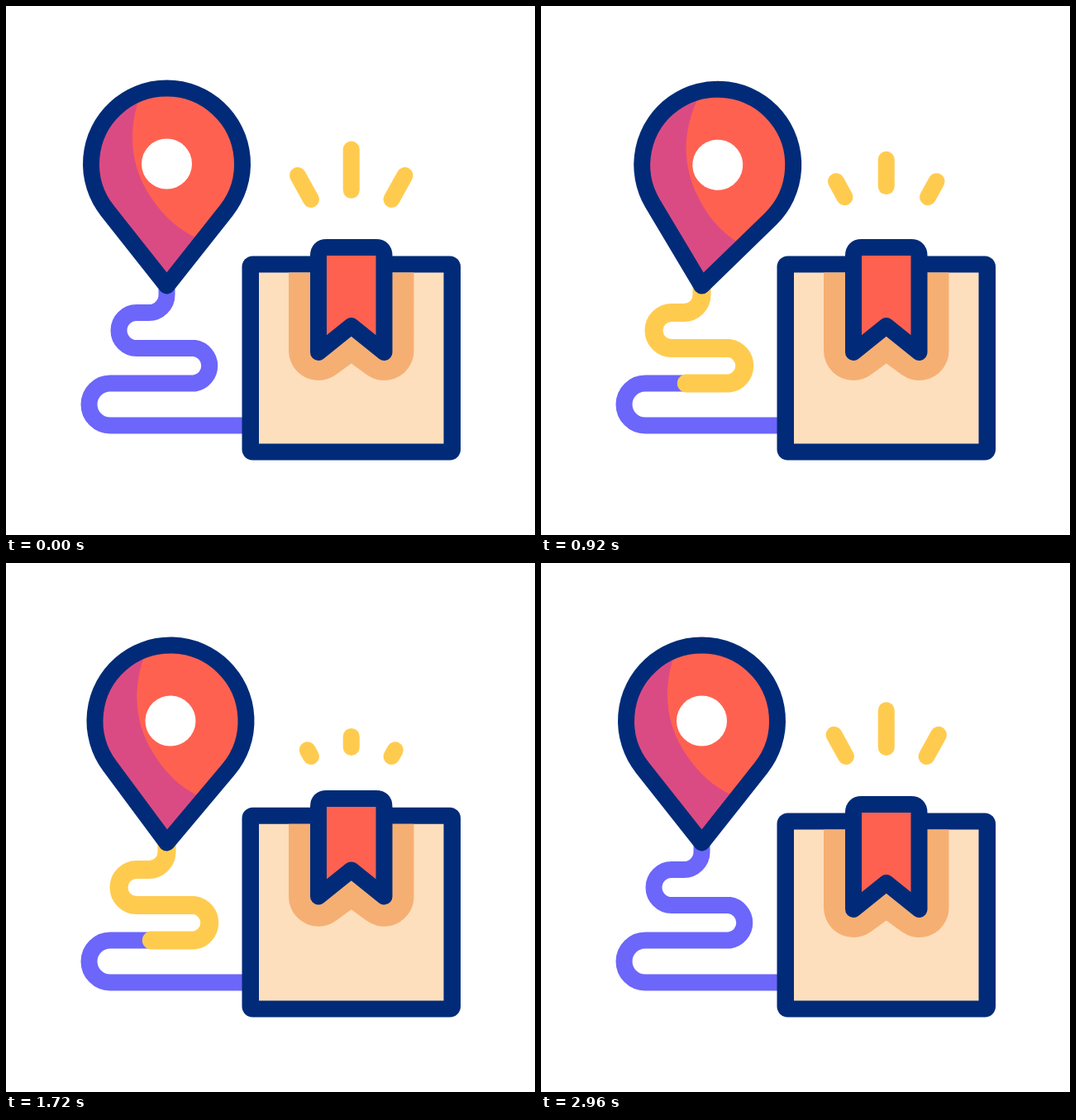
Write an HTML page with a canvas that moves like this. It is 640 by 640 pixels and loops after 3000 ms.

```html
<!DOCTYPE html>
<html lang="en">
<head>
<meta charset="utf-8">
<title>Parcel tracking</title>
<style>
html, body { margin: 0; width: 100%; height: 100%; overflow: hidden; background: #fff; }
canvas { display: block; width: 640px; height: 640px; }
</style>
</head>
<body>
<canvas id="stage" width="640" height="640"></canvas>
<script>
const ctx = document.getElementById('stage').getContext('2d');
const NAVY = '#012b78', RED = '#ff6150', PINK = '#db4b83', PURPLE = '#6c66fa',
      YELLOW = '#ffcb4f', PEACH = '#fddfbd', ORANGE = '#f6af73';
const LOOP = 3000;

const route = new Path2D('M194.5 338V349.5A21.5 21.5 0 0 1 173 371H158A21.5 21.5 0 0 0 158 414' +
  'H228A21.5 21.5 0 0 1 228 456.5H126A25.5 25.5 0 0 0 126 507.5H296');
const ROUTE_LENGTH = 617;

// The pin is drawn around its tip, so it can swing from there.
const pin = new Path2D('M0 0L-71.8 -90.8A91.5 91.5 0 1 1 71.8 -90.8Z');
const pinShade = new Path2D('M-33 -228C-48 -184 -43 -142 -19 -107C-4 -84 14 -68 38 -57L0 0L-130 -60V-228Z');

const rays = [[369, 234, 353, 205], [417.75, 223, 417.75, 173.5], [466.5, 234, 482.5, 205]];
// Per burst: outer end moves from, to; inner end moves from, to.
const bursts = [[-400, 0, 0, 360], [620, 1020, 885, 1250], [1615, 2015, 1880, 2245], [2600, 3000, 3000, 3360]];
const waves = [720, 1520];
const swing = [[200, 0], [600, -5.5], [1030, 9.8], [1430, -11.8], [1840, 5], [2200, -6.3], [2520, 0]];

const ramp = (t, a, b) => Math.min(1, Math.max(0, (t - a) / (b - a)));
const smooth = u => (1 - Math.cos(Math.PI * u)) / 2;
const mix = (a, b, u) => a + (b - a) * u;

function ease(keys, t) {
  let value = keys[0][1];
  for (let i = 1; i < keys.length; i++) {
    const [t0, v0] = keys[i - 1], [t1, v1] = keys[i];
    value += (v1 - v0) * smooth(ramp(t, t0, t1));
  }
  return value;
}

function stroke(path, color, width) {
  ctx.strokeStyle = color;
  ctx.lineWidth = width;
  ctx.stroke(path);
}

function fill(path, color) {
  ctx.fillStyle = color;
  ctx.fill(path);
}

function drawRoute(t) {
  stroke(route, PURPLE, 20);
  for (const start of waves) {
    const head = ramp(t, start, start + 400), tail = ramp(t, start + 400, start + 820);
    if (head <= 0 || tail >= 1) continue;
    ctx.setLineDash([(head - tail) * ROUTE_LENGTH, 9999]);
    ctx.lineDashOffset = -tail * ROUTE_LENGTH;
    stroke(route, YELLOW, 22);
    ctx.setLineDash([]);
  }
}

function drawPin(t) {
  const lift = 26 * Math.max(0, 1 - ((t - 400) / 180) ** 2);
  ctx.save();
  ctx.translate(194.5, 338.5 - lift);
  ctx.rotate(ease(swing, t) * Math.PI / 180);
  fill(pin, RED);
  ctx.save();
  ctx.clip(pin);
  fill(pinShade, PINK);
  ctx.restore();
  stroke(pin, NAVY, 20);
  const hole = new Path2D();
  hole.arc(0, -147.5, 30.5, 0, 7);
  fill(hole, '#fff');
  ctx.restore();
}

function drawRays(t) {
  for (const [a, b, c, d] of bursts) {
    const head = ramp(t, a, b), tail = ramp(t, c, d);
    if (head <= 0 || tail >= 1) continue;
    for (const [x0, y0, x1, y1] of rays) {
      const line = new Path2D();
      line.moveTo(mix(x0, x1, tail), mix(y0, y1, tail));
      line.lineTo(mix(x0, x1, head), mix(y0, y1, head));
      stroke(line, YELLOW, 20);
    }
  }
}

function drawBox(t) {
  const rise = smooth(ramp(t, 1520, 1920)) - smooth(ramp(t, 2480, 2880));
  const top = 302.5 - 13.5 * rise;

  const outer = new Path2D();
  outer.roundRect(285.5, top, 264.5, 549.5 - top, 13);
  fill(outer, NAVY);
  const inner = new Path2D();
  inner.rect(306, top + 20, 223.5, 509.5 - top);
  fill(inner, PEACH);

  ctx.save();
  ctx.clip(inner);
  const low = 417 - 26.5 * rise;
  const shade = new Path2D(`M378 250V${low}L417.75 ${low - 29}L457.5 ${low}V250Z`);
  fill(shade, ORANGE);
  stroke(shade, ORANGE, 72);
  ctx.restore();

  const y = 292 - 14 * rise, end = 419 - 31 * rise;
  const ribbon = new Path2D(`M378 ${y + 10}V${end}L417.75 ${end - 32}L457.5 ${end}V${y + 10}` +
    `Q457.5 ${y} 447.5 ${y}H388Q378 ${y} 378 ${y + 10}Z`);
  fill(ribbon, RED);
  stroke(ribbon, NAVY, 20);
}

function draw(now) {
  const t = now % LOOP;
  ctx.fillStyle = '#fff';
  ctx.fillRect(0, 0, 640, 640);
  ctx.lineCap = ctx.lineJoin = 'round';
  drawRoute(t);
  drawPin(t);
  drawRays(t);
  drawBox(t);
}

const begin = performance.now();
function tick() {
  draw(performance.now() - begin);
  requestAnimationFrame(tick);
}
tick();
</script>
</body>
</html>
```
